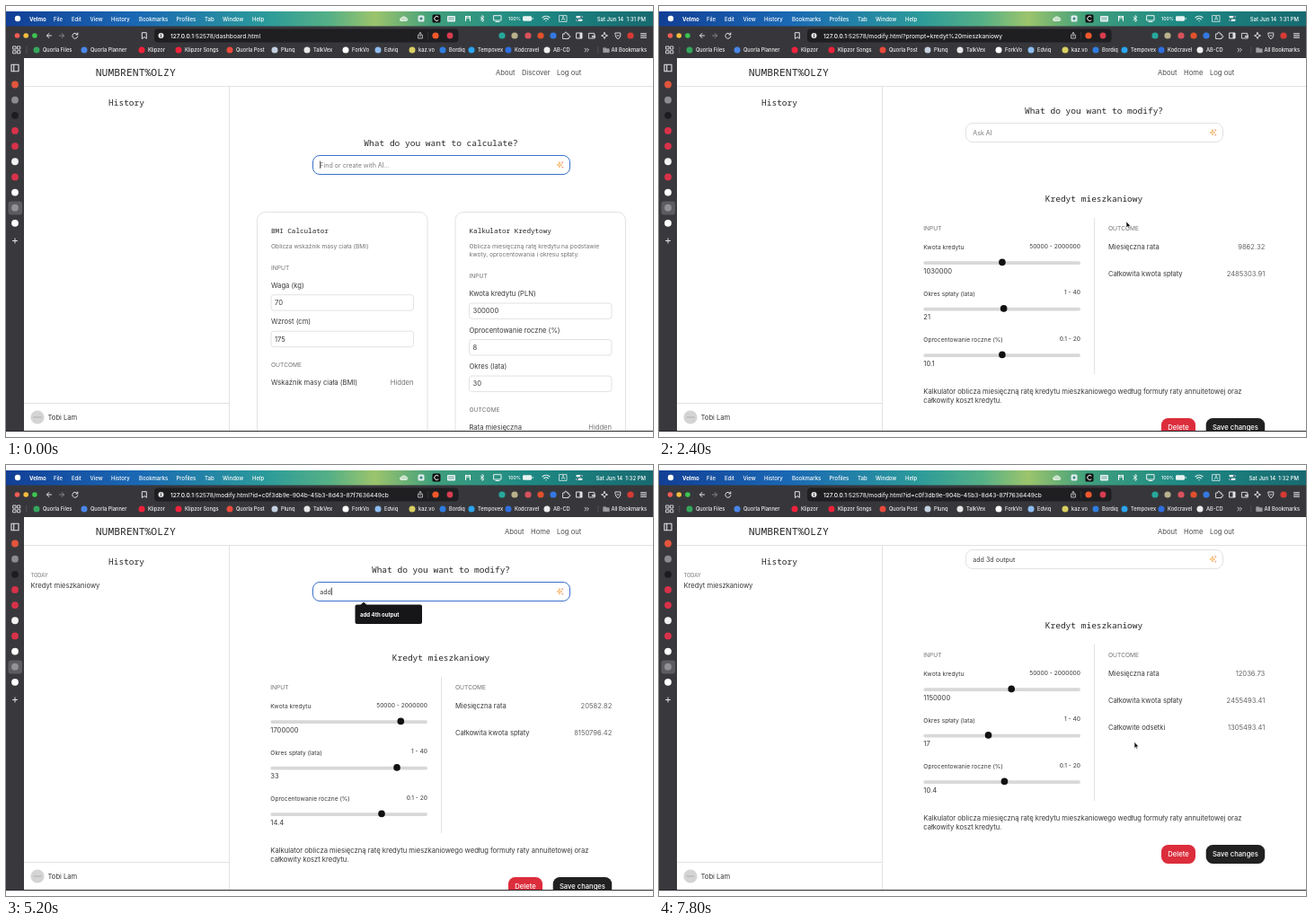
These frames come from a looping animation (720 px wide and 480 px high, 8000 ms). An HTML page:

```html
<!DOCTYPE html>
<html lang="en">
<head>
<meta charset="utf-8">
<title>Calculator builder</title>
<style>
html, body { margin: 0; width: 100%; height: 100%; overflow: hidden; background: #fff; }
svg { display: block; width: 100%; height: 100%; }
text { font-family: Inter, sans-serif; white-space: pre; }
.mono { font-family: "Noto Sans Mono", monospace; }
</style>
</head>
<body>
<svg id="stage" viewBox="0 0 720 480">
  <defs>
    <linearGradient id="sky">
      <stop offset="0" stop-color="#123f96"/>
      <stop offset=".2" stop-color="#1a68b4"/>
      <stop offset=".4" stop-color="#2b9a9a"/>
      <stop offset=".5" stop-color="#55b086"/>
      <stop offset=".57" stop-color="#9cc46c"/>
      <stop offset=".66" stop-color="#409f7c"/>
      <stop offset=".8" stop-color="#1f8a84"/>
      <stop offset="1" stop-color="#176a70"/>
    </linearGradient>
    <clipPath id="main"><rect x="249" y="90" width="471" height="383"/></clipPath>
  </defs>
  <g id="chrome"></g>
  <g id="scene"></g>
</svg>
<script>
const STEP = 200, LOOP = 8000;
const INK = '#3a3a3a', GREY = '#747474', LINE = '#e2e2e2';
const BODY = 7.62, SMALL = 6.67, FIELD = 7.1, HEAD = 9.52;
const $ = id => document.getElementById(id);

// Drawing helpers
const attrs = o => Object.entries(o).map(([k, v]) => `${k}="${v}"`).join(' ');
const text = (x, y, s, size = BODY, fill = INK, o = {}) =>
  `<text x="${x}" y="${y}" font-size="${size}" fill="${fill}" ${attrs(o)}>${s}</text>`;
const END = { 'text-anchor': 'end' };
const mono = (x, y, s, size = HEAD, o = {}) => text(x, y, s, size, '#262626', { class: 'mono', ...o });
const centred = (x, y, s) => mono(x, y, s, HEAD, { 'text-anchor': 'middle' });
const rect = (x, y, w, h, fill, r = 0, o = {}) =>
  `<rect x="${x}" y="${y}" width="${w}" height="${h}" rx="${r}" fill="${fill}" ${attrs(o)}/>`;
const frame = (x, y, w, h, r, stroke = LINE, fill = '#fff') => rect(x, y, w, h, fill, r, { stroke });
const dot = (x, y, r, fill) => `<circle cx="${x}" cy="${y}" r="${r}" fill="${fill}"/>`;
const path = (x, y, d, stroke = '#e4e4e6', width = 1, fill = 'none') =>
  `<path transform="translate(${x} ${y})" d="${d}" stroke="${stroke}" stroke-width="${width}" fill="${fill}" stroke-linecap="round" stroke-linejoin="round"/>`;

function chrome() {
  const white = '#fff';
  const menus = [['File', 53], ['Edit', 73], ['View', 93.5], ['History', 117], ['Bookmarks', 148],
    ['Profiles', 189.5], ['Tab', 221], ['Window', 241], ['Help', 274]];
  const marks = [['Quorla Files', 34, '#35a65c'], ['Quorla Planner', 87, '#4a86e8'], ['Klipzor', 151, '#f0223c'],
    ['Klipzor Songs', 192, '#f0223c'], ['Quorla Post', 249, '#e84a3c'], ['Plunq', 299, '#c3d0e0'],
    ['TalkVex', 335, '#e6e6e6'], ['ForkVo', 378, '#fff'], ['Edviq', 414, '#8ebcf0'], ['kaz.vo', 452, '#d9cf62'],
    ['Bordiq', 486, '#2f7de0'], ['Tempovex', 518, '#2ba4ee'], ['Kodcravel', 559, '#2f6fe0'], ['AB-CD', 602, '#eee']];
  const tabs = ['#e2553d', '#8c8c90', '#1d1d20', '#d8324a', '#d8324a', '#f2f2f2', '#d8324a', '#fff', '#929296', '#fff'];
  const addons = [[552, '#27a89c'], [566, '#b9b08c'], [581, '#d8525c'], [595, '#e0512c'], [609, '#3478e0'], [695, '#d83a34']];
  const box = 'M-3-3H3V3H-3Z';

  return [
    rect(0, 6, 720, 17, 'url(#sky)'),
    dot(13, 14, 3.2, white),
    text(26, 16.5, 'Velmo', 6.1, white, { 'font-weight': 700 }),
    ...menus.map(([s, x]) => text(x, 16.5, s, 6, white, { 'font-weight': 500 })),
    path(443, 14, 'M-3 2.5H3A2 2 0 0 0 2-1A3 3 0 0 0-3-.5A1.5 1.5 0 0 0-3 2.5Z', white, .7, '#ffffff99'),
    rect(458.5, 10.5, 7, 7, '#dcebea', 1.5), dot(462, 14, 1.5, '#39847f'),
    rect(474.5, 9.5, 9, 9, '#111', 1.5), path(479, 14, 'M2-2A2.6 2.6 0 1 0 2 2', white, 1),
    rect(491, 11, 9, 6.5, '#e8f2f1', 1), path(495.5, 14, 'M-3-1H3M-3 1H3', '#39847f', .7),
    path(514, 14, 'M-2.5-2.5V2.5M-2.5-2.5H-1M2.5-2.5V2.5M2.5-2.5H1M-1-2.5V0M1-2.5V0', white, 1),
    path(530, 14, 'M-2-1.6L2 1.6L0 3.4V-3.4L2-1.6L-2 1.6', white, .8),
    path(547, 13.5, 'M-4-2.8H4V2.5H-4ZM-2 4H2', white, .9),
    text(559, 16, '100%', 5.2, white, { 'font-weight': 500 }),
    rect(575, 11.2, 10, 5.6, '#e8f2f1', 1.4), rect(585.6, 13, 1, 2, '#e8f2f1'),
    path(601, 14, 'M-4-1.2A6 6 0 0 1 4-1.2M-2.3.8A3.5 3.5 0 0 1 2.3.8M0 2.6V2.7', white, 1.1),
    path(620, 14, 'M-4-3.4H4V3.4H-4Z', white, .7), text(618, 16.2, 'A', 6, white),
    path(638, 14, 'M-2.5-1.8H2.5M-2.5 1.8H2.5', white, 2.2), dot(640, 12.2, 1, '#246'), dot(636, 15.8, 1, '#246'),

    rect(0, 22.5, 720, 36, '#37373b'),
    rect(0, 58, 20, 415, '#39393d'),
    ...['#f25c54', '#f4bd3e', '#3cc551'].map((c, i) => dot(12.5 + i * 9.7, 33, 2.8, c)),
    path(48, 33, 'M2.5 0H-2.5M-.2-2.5L-2.5 0L-.2 2.5'),
    path(62, 33, 'M-2.5 0H2.5M.2-2.5L2.5 0L.2 2.5', '#85858a'),
    path(77, 33, 'M2.5-1.2A3 3 0 1 0 2.8 1M2.8-3V-1H.8'),
    path(154, 33, 'M-2.3-3.3H2.3V3.3L0 1.5L-2.3 3.3Z'),
    rect(165, 25.5, 338.5, 15, '#1f1f22', 4),
    dot(172.5, 33, 3, '#e4e4e6'), rect(172.1, 32.4, .9, 2.3, '#222'), rect(172.1, 31, .9, .8, '#222'),
    path(461, 33, 'M-1.2-.8H-2.4V3H2.4V-.8H1.2M0 1V-3.4M-1.3-2.2L0-3.4L1.3-2.2', '#d8d8da', .8),
    rect(469.5, 29, .6, 8, '#444'), dot(478, 33, 3.6, '#f0582c'), dot(494, 33, 3.4, '#d83c50'),
    ...addons.map(([x, c]) => dot(x, 33, 3.6, c)),
    path(623, 33, 'M-3-2H-1A1.2 1.2 0 1 1 1-2H3V0A1.2 1.2 0 1 1 3 2V3.5H-3Z', '#e4e4e6', .9),
    path(638, 33, box), rect(638.5, 30, 2.5, 6, '#e4e4e6'),
    path(652, 33, 'M-3.2-2.6H2.6V-1.2H3.2V3H-3.2ZM.8.2H3.2V1.6H.8Z', '#e4e4e6', .9),
    path(666, 33, 'M0-3.5L1-1L3.5 0L1 1L0 3.5L-1 1L-3.5 0L-1-1Z', '#e4e4e6', .9),
    path(681, 33, 'M-2.8-3H2.8V0Q2.5 2.5 0 3.8Q-2.5 2.5-2.8 0ZM-1 0H1', '#e4e4e6', .9),
    path(709.5, 33, 'M-3-2.2H3M-3 0H3M-3 2.2H3', '#f2f2f2', 1),

    ...[[-4, -4], [.8, -4], [-4, .8], [.8, .8]].map(([x, y]) => path(12 + x, 49 + y, 'M0 0H3V3H0Z', '#e4e4e6', .9)),
    rect(22.5, 45, .7, 8, '#5c5c61'),
    ...marks.map(([s, x, c]) => dot(x, 49, 3.5, c) + text(x + 7, 51.1, s, 5.7, '#f2f2f2', { 'font-weight': 500 })),
    path(646, 49, 'M-2-1.8L-.2 0L-2 1.8M.6-1.8L2.4 0L.6 1.8', '#e4e4e6', .9),
    rect(658.5, 45, .7, 8, '#5c5c61'),
    path(668, 49, 'M-3-2.2H-.5L.3-1.2H3.2V2.6H-3Z', '#9c9ca0', .8, '#9c9ca0'),
    text(713, 51.1, 'All Bookmarks', 5.75, '#f2f2f2', { ...END, 'font-weight': 500 }),

    path(10, 69, 'M-4-3.8H4V3.8H-4ZM-1.3-3.8V3.8', '#e4e4e6', 1.1),
    rect(2.5, 217.5, 15.5, 15, '#5c5c61', 3),
    ...tabs.map((c, i) => dot(10, 87.5 + i * 17.15, 3.9, c)),
    path(10, 261.5, 'M-2.5 0H2.5M0-2.5V2.5'),

    rect(20, 58, 700, 415, '#fff'),
    mono(99.7, 78, 'NUMBRENT%OLZY', 11.43),
    rect(20, 89, 700, 1, LINE), rect(248, 90, 1, 383, LINE), rect(20, 442, 228, 1, LINE),
    centred(134, 110.6, 'History'),
    dot(35, 458, 7.6, '#d4d4d4'), rect(30.5, 457.3, 9, 1.4, '#b9b9b9'),
    text(46.5, 460.8, 'Tobi Lam')
  ].join('');
}

// Page parts
function star(x, y) {
  return path(x, y, 'M-.6-3.2L.2-.9L2.4 0L.2.9L-.6 3.2L-1.4.9L-3.6 0L-1.4-.9Z', '#f3a548', .6, '#fde3b4')
    + path(x, y, 'M2.6-3.6V-1.8M1.7-2.7H3.5M2.8 2V3.4M2.1 2.7H3.5', '#ef8a5a', .6);
}

function search(y, s, hint) {
  const border = s.focus ? '#3a70cc' : s.filled ? '#cfdaee' : LINE;
  return frame(341.5, y, 286, 21, 7.5, border, s.filled ? '#e8f0fe' : '#fff')
    + text(349.3, y + 13, s.text || hint, FIELD, s.text ? INK : '#7c7c7c', { id: 'query' })
    + (s.focus ? rect(349.4, y + 6, .7, 8.5, '#222', 0, { id: 'caret' }) : '')
    + star(616.5, y + 10.4)
    + (s.popup ? rect(388.5, y + 25, 74.5, 21.4, '#161618', 2)
      + path(398, y + 22, 'M0 0L3.6 3.6H-3.6Z', 'none', 0, '#161618')
      + text(394, y + 38.3, s.popup, 6.05, '#fff', { 'font-weight': 700 }) : '');
}

function card(x, title, about, fields, outcome) {
  let y = 269.5 + (about.length - 1) * 9.3;
  let out = frame(x - 15.5, 229.5, 189.5, 270, 9) + mono(x, 252.7, title, 7.62)
    + about.map((s, i) => text(x, 269.5 + i * 9.3, s, SMALL, GREY)).join('')
    + text(x, y + 24, 'INPUT', SMALL, GREY);
  for (const [label, value] of fields) {
    out += text(x, y + 44.3, label) + frame(x, y + 52.2, 158.5, 17.4, 3) + text(x + 4, y + 63.6, value);
    y += 40.5;
  }
  return out + text(x, y + 51.2, 'OUTCOME', SMALL, GREY)
    + text(x, y + 71.6, outcome) + text(x + 158.5, y + 71.6, 'Hidden', BODY, GREY, END);
}

const loanCard = x => card(x, 'Kalkulator Kredytowy',
  ['Oblicza miesięczną ratę kredytu na podstawie', 'kwoty, oprocentowania i okresu spłaty.'],
  [['Kwota kredytu (PLN)', 300000], ['Oprocentowanie roczne (%)', 8], ['Okres (lata)', 30]], 'Rata miesięczna');
const bmiCard = x => card(x, 'BMI Calculator', ['Oblicza wskaźnik masy ciała (BMI)'],
  [['Waga (kg)', 70], ['Wzrost (cm)', 175]], 'Wskaźnik masy ciała (BMI)');

const home = s => centred(484, 156.2, 'What do you want to calculate?') + search(166.5, s, 'Find or create with AI...')
  + (s.cards === 2 ? bmiCard(295) + loanCard(515.5) : s.cards ? loanCard(295) : '');

function slider(y, label, min, max, value) {
  const x = 298 + 167 * (value - min) / (max - min);
  return text(294.3, y, label, SMALL) + text(469, y - 1.7, `${min} - ${max}`, SMALL, INK, END)
    + rect(294.3, y + 12.8, 174.7, 3.8, '#d8d8d8', 1.9) + dot(x, y + 14, 3.8, '#111')
    + text(294.3, y + 26.2, value);
}

function button(x, w, fill, label) {
  return rect(x, 459, w, 21, fill, 7.5)
    + text(x + w / 2, 472.2, label, BODY, '#fff', { 'text-anchor': 'middle', 'font-weight': 500 });
}

function loan(s) {
  const [sum, years, percent] = s.loan, rate = percent / 1200, months = years * 12;
  const monthly = sum * rate / (1 - (1 + rate) ** -months), total = monthly * months;
  const results = [['Miesięczna rata', monthly], ['Całkowita kwota spłaty', total]];
  if (s.interest) results.push(['Całkowite odsetki', total - sum]);
  return centred(484, 217.8, 'Kredyt mieszkaniowy')
    + text(294.3, 249.8, 'INPUT', SMALL, GREY) + text(500, 249.8, 'OUTCOME', SMALL, GREY)
    + slider(271.4, 'Kwota kredytu', 50000, 2000000, sum)
    + slider(322.9, 'Okres spłaty (lata)', 1, 40, years)
    + slider(374.4, 'Oprocentowanie roczne (%)', .1, 20, percent)
    + rect(484, 236, 1, 174, LINE)
    + results.map(([label, v], i) => text(500, 270.5 + i * 30.3, label)
      + text(674.3, 270.5 + i * 30.3, v.toFixed(2), BODY, '#666', END)).join('')
    + text(294.3, 432.4, 'Kalkulator oblicza miesięczną ratę kredytu mieszkaniowego według formuły raty annuitetowej oraz')
    + text(294.3, 441.6, 'całkowity koszt kredytu.')
    + button(559, 38, '#dc2d3c', 'Delete') + button(608.7, 65.5, '#212121', 'Save changes');
}

const modify = s => `<g transform="translate(0 ${-s.scroll})">`
  + centred(484, 119.8, 'What do you want to modify?') + search(130.5, s, 'Ask AI') + (s.loan ? loan(s) : '') + '</g>';

const spinner = turn => rect(249, 58, 471, 415, '#fff', 0, { opacity: .79 })
  + `<g fill="none" stroke-width="1.9" transform="translate(484.3 266.5) rotate(${turn})">
     <circle r="9" stroke="#cfcfcf"/><path d="M0-9A9 9 0 0 1 9 0" stroke="#111"/></g>`;

const pointers = {
  arrow: 'M0 0V7L1.6 5.6L2.7 8L3.8 7.5L2.7 5.2H4.8Z',
  hand: 'M-.9 4.8V.6Q0-.5.9.6V3.2L3.6 4Q4 5.8 3.2 8.6H-.8Q-2.6 6.6-3.2 5Q-2.4 4-.9 5.6Z'
};
const pointer = ([kind, x, y]) => kind === 'arrow'
  ? path(x, y, pointers.arrow, '#fff', .6, '#111') : path(x, y, pointers.hand, '#333', .8, '#fff');

// Each entry: step number and what changes from there on
const timeline = [
  [0, { page: home, cards: 2, url: 'dashboard.html', text: '', focus: 1, scroll: 0, time: '1:31' }],
  [1, { text: 'kr' }],
  [2, { text: 'kred', cards: 1, popup: 'kredyt mieszkaniowy' }],
  [3, { text: 'kredyt', at: ['arrow', 420, 205] }],
  [4, { text: 'kredyt mieszkaniowy', cards: 0, popup: '', filled: 1, at: ['arrow', 440, 203] }],
  [5, { at: ['arrow', 530, 196], focus: 0 }],
  [6, { at: ['hand', 612, 183] }],
  [7, { at: ['hand', 618, 179.5] }],
  [9, { page: modify, url: 'modify.html?prompt=kredyt%20mieszkaniowy', text: '', filled: 0, busy: 1, at: ['arrow', 617, 180] }],
  [12, { busy: 0, loan: [1030000, 21, 10.1], at: ['arrow', 520, 240] }],
  [13, { scroll: 37, at: ['hand', 382, 247] }],
  [14, { loan: [850000, 21, 10.1], at: ['hand', 367, 247] }],
  [15, { loan: [700000, 21, 10.1], at: ['hand', 368, 290] }],
  [16, { loan: [700000, 14, 10.1], at: ['hand', 353.5, 301.5] }],
  [17, { loan: [700000, 33, 10.1], at: ['hand', 435, 301.5] }],
  [18, { loan: [700000, 33, 14.4], at: ['hand', 418, 352] }],
  [19, { loan: [1700000, 33, 14.4], at: ['hand', 439, 249], time: '1:32' }],
  [20, { at: ['hand', 640, 433] }],
  [21, { url: 'modify.html?id=c0f3db9e-904b-45b3-8d43-87f7636449cb', saved: 1, scroll: 0, at: ['arrow', 500, 330] }],
  [22, { bar: 1, at: ['arrow', 379.5, 219.5] }],
  [23, { bar: 0, at: ['arrow', 384, 160] }],
  [24, { focus: 1, at: ['arrow', 388, 142] }],
  [25, { text: 'a', at: null }],
  [26, { text: 'add', popup: 'add 4th output' }],
  [27, { text: 'add 3', popup: '' }],
  [28, { text: 'add 3d ou' }],
  [29, { text: 'add 3d output' }],
  [30, { at: ['arrow', 560, 160] }],
  [31, { at: ['hand', 617, 142] }],
  [32, { focus: 0, busy: 1, at: ['arrow', 617, 144] }],
  [36, { busy: 0, interest: 1, loan: [1030000, 21, 10.1], at: ['arrow', 560, 220] }],
  [37, { scroll: 36, loan: [1150000, 21, 10.1], at: ['hand', 392, 250] }],
  [38, { loan: [1150000, 17, 10.4], at: ['hand', 385, 353] }],
  [39, { at: ['arrow', 529, 308.5] }]
];

function stateAt(step) {
  return Object.assign({}, ...timeline.filter(([from]) => from <= step).map(([, change]) => change));
}

function draw(step) {
  const s = stateAt(step);
  const links = s.page === home ? [['About', 545], ['Discover', 574]] : [['About', 555], ['Home', 584]];
  $('scene').innerHTML = [
    text(712, 16.5, `Sat Jun 14  ${s.time} PM`, 6, '#fff', { ...END, 'font-weight': 500 }),
    text(183, 35.5, `<tspan fill="#fff">127.0.0.1</tspan>:52578/${s.url}`, 6.65, '#e6e6e8', { 'font-weight': 500 }),
    ...[...links, ['Log out', 613]].map(([label, x]) => text(x, 76.8, label, BODY, '#4c4c4c')),
    s.saved ? text(27.5, 124.6, 'TODAY', 5.71, GREY) + text(27.5, 137, 'Kredyt mieszkaniowy') : '',
    `<g clip-path="url(#main)">${s.page(s)}</g>`,
    s.bar ? rect(715.4, 91, 3.2, 349, '#7d7d7d', 1.6) : '',
    s.busy ? spinner((step - 33) * 72) : '',
    rect(0, 473, 720, 1, '#2b2b2f'),
    s.at ? pointer(s.at) : ''
  ].join('');
  if (s.focus && s.text) $('caret').setAttribute('x', 349.4 + $('query').getComputedTextLength());
}

$('chrome').innerHTML = chrome();
const start = performance.now();
let shown = -1;
function tick(now) {
  const step = Math.floor((Math.max(0, now - start) % LOOP) / STEP);
  if (step !== shown) draw(shown = step);
  requestAnimationFrame(tick);
}
tick(start);
</script>
</body>
</html>
```
